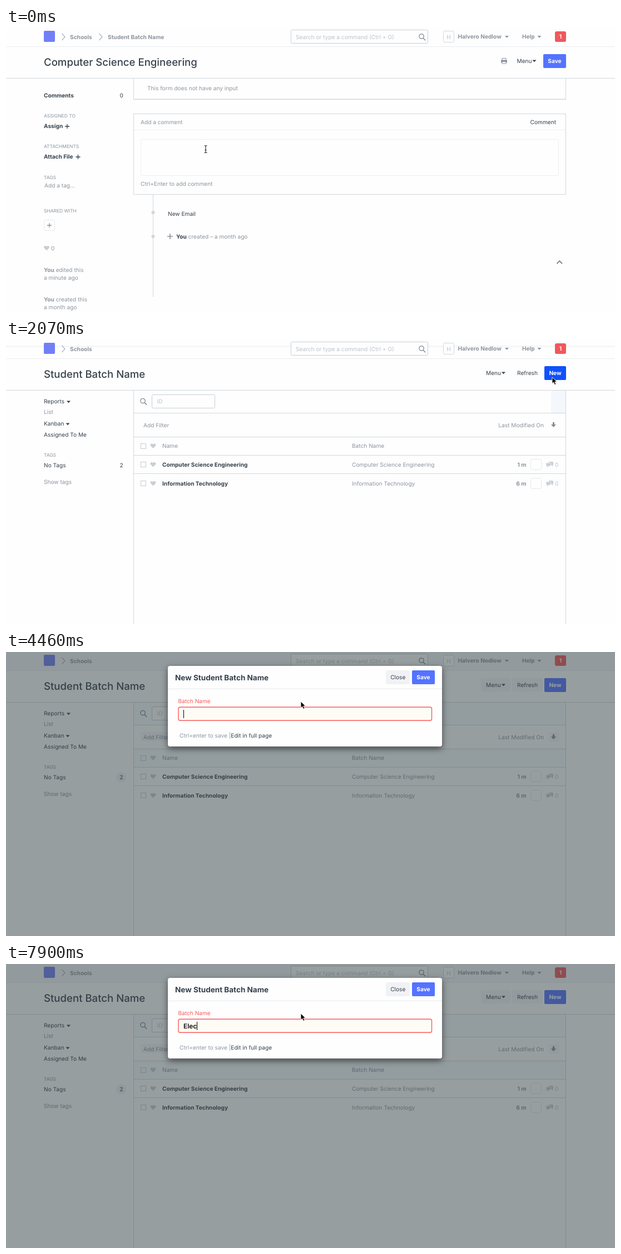
An HTML page that plays this animation: 1095x511 px, repeating every 8 s.

```html
<!DOCTYPE html>
<html lang="en">
<head>
<meta charset="utf-8">
<title>Student batch</title>
<style>
  html, body { margin: 0; width: 100%; height: 100%; overflow: hidden; background: #fefefe; }
  svg { display: block; width: 1095px; height: 511px; }
  text { font: 10.15px Inter, "Open Sans", sans-serif; text-rendering: geometricPrecision; white-space: pre; }
  .b { font-weight: 700; }
  .title { font-size: 18.6px; font-weight: 500; }
  .label { font-size: 8.46px; }
  #modal { filter: drop-shadow(0 4px 6px rgba(0, 0, 0, .55)); }
</style>
</head>
<body>
<svg id="stage" viewBox="0 0 1095 511"></svg>
<script>
const DARK = '#36414c', GREY = '#8d959e', LIGHT = '#bcc3ca', LINE = '#d1d8dd', PALE = '#ebeff2',
      TINT = '#f3f6f9', BLUE = '#5573ff', RED = '#f95c5c';

const text = (x, y, s, fill = DARK, cls = '', anchor = 'start') =>
  `<text x="${x}" y="${y}" fill="${fill}" class="${cls}" text-anchor="${anchor}">${s}</text>`;
const rect = (x, y, w, h, fill, rx = 0, extra = '') =>
  `<rect x="${x}" y="${y}" width="${w}" height="${h}" rx="${rx}" fill="${fill}" ${extra}/>`;
const box = (x, y, w, h, stroke = LINE, rx = 0, extra = '') =>
  rect(x + .5, y + .5, w, h, 'none', rx, `stroke="${stroke}" ${extra}`);
const path = (d, stroke, width = 1) =>
  `<path d="${d}" fill="none" stroke="${stroke}" stroke-width="${width}"/>`;
const hline = (x, y, w, color = LINE) => rect(x, y, w, 1, color);
const vline = (x, y, h, color = LINE) => rect(x, y, 1, h, color);
const plus = (x, y, r, color = DARK, w = 1.3) => path(`M${x - r} ${y}h${2 * r}M${x} ${y - r}v${2 * r}`, color, w);
const drop = (x, y, color = DARK) => `<path d="M${x} ${y}h7l-3.5 3.7z" fill="${color}"/>`;
const chevron = x => path(`M${x} 10l5.5 6l-5.5 6`, '#aab3bc', 1.2);
const lens = (x, y) =>
  `<circle cx="${x}" cy="${y}" r="4.2" fill="none" stroke="#7f8a94" stroke-width="1.3"/>` +
  path(`M${x + 3} ${y + 3}l4 4.3`, '#7f8a94', 1.5);
const heart = (x, y, color = '#c9cfd5') =>
  `<path d="M${x} ${y + 4.5}l-4.3-4.4c-2.2-3 2-6 4.3-2.8c2.3-3.2 6.500-.2 4.300 2.800z" fill="${color}"/>`;
const dashed = (x, y) => box(x, y, 19, 19, LINE, 3, 'stroke-dasharray="2 1.5"');
const button = (x, w, label, id = '') =>
  rect(x, 47, w, 25, BLUE, 2, id && `id="${id}"`) + text(x + w / 2, 62.6, label, '#fff', 'b', 'middle');
const group = (id, ...parts) => `<g id="${id}">${parts.join('')}</g>`;

const nav = group('nav',
  rect(0, 0, 1095, 33, '#fefefe'),
  rect(0, 10, 1095, 3, '#f5f6f8', 0, 'id="band"'),
  rect(0, 0, 1095, 33, '#f4f6f9', 0, 'id="navTint"'),
  hline(0, 33, 1095, '#e9ecef'), hline(0, 90, 1095),
  rect(68, 5, 20, 20, '#717ff6', 2),
  chevron(100.5), text(115, 19.7, 'Schools', GREY, 'b'),
  group('crumb', chevron(167.5), text(183, 19.7, 'Student Batch Name', GREY, 'b')),
  rect(512.5, 3.5, 246, 24, '#fefefe', 2, 'stroke="#c9ced3"'),
  text(521, 19.9, 'Search or type a command (Ctrl + G)', LIGHT), lens(747, 15),
  rect(786.5, 5.5, 19, 20, '#fefefe', 2, `stroke="${LINE}"`),
  text(796, 19.6, 'H', LIGHT, '', 'middle'),
  text(812.5, 19.3, 'Halvero Nedlow', GREY, 'b'), drop(897, 14, GREY),
  text(928, 19.3, 'Help', GREY, 'b'), drop(955.500, 14, GREY),
  rect(987, 6, 20, 19, '#f0585d', 3), text(997, 19.3, '1', '#fff', 'b', 'middle'));

const sideEntry = (y, lead, rest, below) =>
  `<text x="68" y="${y}" fill="${GREY}"><tspan class="b">${lead}</tspan> ${rest}</text>` +
  text(68, y + 14, below, GREY);

const form = group('form',
  text(68, 68, 'Computer Science Engineering', DARK, 'title'),
  rect(892, 54.5, 7, 4, 'none', 0, `stroke="${GREY}"`),
  rect(890, 57.5, 11, 5, GREY, 1), rect(892, 60.5, 7, 3.5, '#fff', 0, `stroke="${GREY}"`),
  text(918.5, 62.6, 'Menu'), drop(946.5, 57.5), button(966, 41, 'Save'),

  text(68, 125, 'Comments', DARK, 'b'), text(204.5, 125, '0'),
  text(68, 161.3, 'ASSIGNED TO', GREY, 'label'),
  text(68, 180.4, 'Assign', DARK, 'b'), plus(110, 177, 4),
  text(68, 216.4, 'ATTACHMENTS', GREY, 'label'),
  text(68, 235.4, 'Attach File', DARK, 'b'), plus(129.5, 232, 4),
  text(68, 271.5, 'TAGS', GREY, 'label'), text(69, 287.4, 'Add a tag...', GREY),
  text(68, 332.3, 'SHARED WITH', GREY, 'label'), dashed(68, 345), plus(78, 355, 4, GREY),
  heart(73, 396), text(81, 399.9, '0', GREY),
  sideEntry(438.7, 'You', 'edited this', 'a minute ago'),
  sideEntry(491.5, 'You', 'created this', 'a month ago'),

  vline(229, 91, 38), vline(1006, 91, 38), rect(229, 127.5, 778, 1.5, LINE),
  text(254, 112.2, 'This form does not have any input', GREY),
  box(229, 154, 777, 145), hline(230, 183, 776, PALE),
  text(242, 173, 'Add a comment', GREY), text(989, 173, 'Comment', DARK, '', 'end'),
  box(242, 200, 751, 65, PALE, 2), text(242, 284.2, 'Ctrl+Enter to add comment', GREY),
  vline(264, 300, 184),
  ...[332, 375].map(y => `<circle cx="264.5" cy="${y}" r="3" fill="${LINE}"/>`),
  text(291, 337.5, 'New Email'), plus(295, 375, 5, GREY, 1.6),
  `<text x="306" y="378.900" fill="${GREY}"><tspan class="b" fill="${DARK}">You</tspan> created – a month ago</text>`,
  path('M990.500 424l4.800-4.800l4.800 4.800', '#7f8b97', 2));

const listRow = (y, name, age) =>
  box(242, y - 5, 9, 9, '#c5ccd2') + heart(264.5, y) +
  text(281, y + 3.900, name, DARK, 'b') + text(622, y + 3.900, name, GREY) +
  text(935.5, y + 3.900, age, GREY, 'b', 'end') + dashed(943, y - 10) +
  rect(975.500, y - 5, 8.500, 6, '#c9cfd5', 1.500) + rect(971, y - 3, 8.500, 6, '#c9cfd5', 1.500, 'stroke="#fff" stroke-width=".7"') +
  `<path d="M973 ${y + 2.500}v3l3-3zM980 ${y}h3v4z" fill="#c9cfd5"/>` +
  text(987, y + 3.900, '0', LIGHT);

const list = group('list',
  group('listTint',
    rect(230, 91, 776, 40, '#f5f9fd'), rect(230, 175, 776, 32, '#f5f9fd'),
    rect(854, 47, 53, 24, TINT, 2), rect(910, 47, 55, 24, TINT, 2),
    rect(242, 144, 55, 17, TINT, 2), rect(976, 144, 18, 17, TINT, 2)),
  rect(980, 91, 26, 40, '#f4f7fb', 0, 'id="corner"'),
  text(68, 68, 'Student Batch Name', DARK, 'title'),
  text(863, 62.6, 'Menu'), drop(891, 57.5),
  text(937.5, 62.6, 'Refresh', DARK, '', 'middle'), button(968, 39, 'New', 'newButton'),
  text(68, 113.8, 'Reports'), drop(109, 109.5),
  text(68, 133.4, 'List', GREY),
  text(68, 154, 'Kanban'), drop(107.500, 149.5),
  text(68, 173.800, 'Assigned To Me'),
  group('tags',
    text(68, 210, 'TAGS', GREY, 'label'),
    '<circle id="count" cx="207.5" cy="225.5" r="9" fill="#eef1f4"/>',
    text(68, 228.800, 'No Tags'), text(207.7, 228.800, '2', DARK, '', 'middle'),
    text(68, 259.300, 'Show tags', GREY)),
  vline(229, 91, 420), vline(1006, 91, 420),
  ...[131, 174, 207, 240].map(y => hline(230, y, 776)),
  lens(246, 109.5), rect(262.5, 98.5, 113, 24, '#fefefe', 2, 'stroke="#c9ced3"'),
  text(271.5, 114.2, 'ID', LIGHT),
  text(247, 156.5, 'Add Filter', GREY),
  text(967, 156.5, 'Last Modified On', GREY, '', 'end'),
  '<path d="M983 148h3v4h3l-4.500 5l-4.500-5h3z" fill="#858e97"/>',
  box(242, 186, 9, 9, '#c5ccd2'), heart(264.5, 190.5),
  text(281, 194.3, 'Name', GREY), text(622, 194.3, 'Batch Name', GREY),
  listRow(224, 'Computer Science Engineering', '1 m'),
  listRow(258, 'Information Technology', '6 m'));

const modal = group('dialog',
  rect(0, 0, 1095, 511, '#334143', 0, 'opacity=".5"'),
  group('modal',
    rect(291, 25, 493, 145, '#fefefe', 4), hline(291, 66, 493, '#e6e9ec'),
    `<text x="304" y="51" fill="${DARK}" class="b" style="font-size:13.54px">New Student Batch Name</text>`,
    rect(683, 33, 43, 25, '#f0f2f5', 2, 'id="closeFill"'),
    text(704.8, 48.700, 'Close', DARK, '', 'middle'),
    rect(730, 33, 41, 25, BLUE, 2), text(750.5, 48.700, 'Save', '#fff', 'b', 'middle'),
    text(309.5, 91.600, 'Batch Name', RED),
    rect(310, 99.2, 455.5, 24, '#fefefe', 3, `id="field" stroke="${RED}"`),
    '<text id="typed" x="319" y="116" fill="#111" style="font-size:11.84px;font-weight:600"></text>',
    rect(319, 104, 1, 15, '#000', 0, 'id="caret"'),
    text(312, 154, 'Ctrl+enter to save |', GREY), text(404.300, 154, 'Edit in full page')));

const cursors =
  '<path id="arrow" d="M0 0v11.500l2.700-2.500l2 4.600l2.200-1l-2-4.400h3.700z" fill="#000" stroke="#fff" stroke-width=".9"/>' +
  '<path id="hand" d="M-1 0q1-1 2 0v5l5 1.300q1 .5.800 2l-.8 4.700h-5.500l-4-5.500q0-1.500 1.500-1l1 1z" fill="#fff" stroke="#000" stroke-width=".9"/>' +
  '<path id="beam" d="M-2.500-6.500q2.500 0 2.500 1.500q0-1.500 2.500-1.500M0-5v10M-2.500 6.500q2.500 0 2.500-1.500q0 1.500 2.500 1.500M-1.500 1.500h3" fill="none" stroke="#222" stroke-width="1.1"/>';

document.getElementById('stage').innerHTML =
  rect(0, 0, 1095, 511, '#fefefe') + nav + form + list + modal + cursors;

const el = id => document.getElementById(id);
const show = (id, on) => { el(id).style.display = on ? '' : 'none'; };
const last = (steps, t) => steps.findLast(step => t >= step[0]);

// time, cursor shape, x, y
const pointer = [
  [0, 'beam', 359, 218], [140, 'arrow', 325, 160], [290, 'arrow', 262, 72], [440, 'hand', 230, 22],
  [590, 'hand', 225, 15], [880, 'arrow', 225, 15], [1180, 'arrow', 262, 22], [1330, 'arrow', 440, 50],
  [1480, 'arrow', 800, 78], [1620, 'arrow', 1003, 72], [1770, 'arrow', 982, 67],
  [2360, 'arrow', 850, 80], [2510, 'arrow', 590, 90], [2660, 'arrow', 530, 89]];

// time, typed text, caret visible
const typing = [
  [0, '', 0], [2510, '', 1], [2960, '', 0], [3410, '', 1], [3860, '', 0], [4460, '', 1], [4910, '', 0],
  [5360, '', 1], [5960, '', 0], [6410, '', 1], [6710, 'E', 1], [7160, 'E', 0], [7310, 'Ele', 1],
  [7750, 'Ele', 0], [7900, 'Elec', 1]];

const newFill = [[0, '#5573ff'], [1770, '#2f5eff'], [2070, '#0f51fb'], [2210, '#2f52f0'], [2360, '#5573ff']];
const listFade = [[0, .45], [1030, .86], [1180, 1]];

function render(t) {
  const onList = t >= 880, open = t >= 2210, settled = t >= 2360;
  const fading = onList && t < 1180;
  show('form', !onList);
  show('crumb', !onList);
  show('list', onList);
  show('tags', t >= 1180);
  show('navTint', fading || open);
  el('navTint').setAttribute('y', fading ? 10 : 0);
  el('navTint').setAttribute('height', fading ? 23 : 33);
  show('band', onList && !open);
  show('listTint', fading || open);
  show('corner', onList && !open);
  show('count', open);
  el('list').style.opacity = last(listFade, t)[1];
  el('newButton').setAttribute('fill', last(newFill, t)[1]);

  show('dialog', open);
  el('modal').setAttribute('transform', `translate(0 ${settled ? 0 : -7.5})`);
  show('closeFill', settled);
  el('field').setAttribute('fill', settled ? '#fffcf5' : '#fefefe');
  el('field').setAttribute('stroke-width', settled ? 1.4 : 1);

  const [, word, caretOn] = last(typing, t);
  el('typed').textContent = word;
  show('caret', caretOn);
  if (caretOn) el('caret').setAttribute('x', 319 + Math.round(word ? el('typed').getComputedTextLength() : 0));

  const [, shape, x, y] = last(pointer, t);
  for (const id of ['arrow', 'hand', 'beam']) show(id, id === shape);
  el(shape).setAttribute('transform', `translate(${x} ${y})`);
}

const start = performance.now();
function tick() {
  render((performance.now() - start) % 8000);
  requestAnimationFrame(tick);
}
tick();
</script>
</body>
</html>
```
